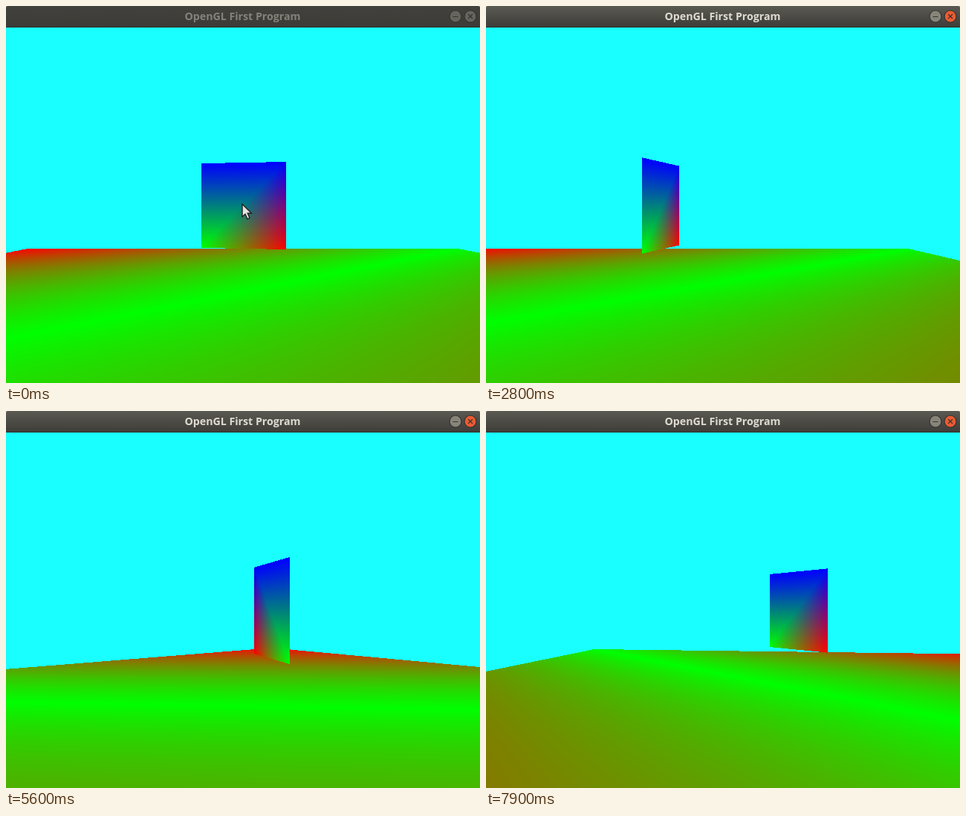
An HTML page with a canvas for the animation above (8 s loop, 638 by 508 pixels).

```html
<!DOCTYPE html>
<html lang="en">
<head>
<meta charset="utf-8">
<title>OpenGL First Program</title>
<style>
  html, body { margin: 0; width: 638px; height: 508px; overflow: hidden; background: #ddd; }
  header {
    position: absolute; top: 0; left: 0; width: 637px; height: 29px; padding-right: 1px;
    border-radius: 2px 2px 0 0; box-shadow: inset 0 -1px #32312d;
    background: linear-gradient(#42413c, #3c3b37); color: #85827b;
    font: bold 14.2px/28px "Open Sans", sans-serif; text-align: center;
  }
  header.active { background: linear-gradient(#5a5952, #3d3c38); color: #dfdbd2; }
  header svg { position: absolute; left: 596px; top: 5px; }
  circle { fill: #66645d; stroke: #34332f; }
  .active circle { fill: #87847a; }
  .active .close { fill: #ec5b31; }
  canvas { position: absolute; top: 29px; left: 0; }
  #cursor { position: absolute; }
</style>
</head>
<body>
<header>
  OpenGL First Program
  <svg width="40" height="18" fill="none" stroke="#34332f" stroke-width="1.2">
    <circle cx="9" cy="9" r="8"/>
    <circle class="close" cx="29" cy="9" r="8"/>
    <path d="M5.5 9.5h7M26 6l6 6M32 6l-6 6"/>
  </svg>
</header>
<canvas width="638" height="479"></canvas>
<svg id="cursor" width="16" height="24">
  <path d="M1 1V18L5 14.4L8 21L11 19.6L8.2 13.2H13.4Z" fill="#e4e4e4" stroke="#222" stroke-width="1.4"/>
</svg>
<script>
const W = 638, H = 479, DURATION = 8000, STEP = 100;
const FOCAL = 240 / Math.tan(Math.PI / 8), CX = 319, CY = 240;

// The camera circles the panel: [seconds, value], angles in degrees
const distance = track([4, 5], [4.5, 2.75], [5, 4.65], [6, 4.4], [6.3, 2.29], [6.5, 1.4], [7, 4.66], [7.9, 5.59]);
const azimuth = track([1.8, 0], [2.8, -8], [4, 6.2], [5.1, 6.2], [7, -189.5], [7.9, -268.1]);
const yaw = track([5.1, 0], [6.3, -117.4], [7, -219.3], [7.9, -277.8]);
const panelAngle = t => 29.8 * t - 10.3;

const ctx = document.querySelector('canvas').getContext('2d');
const header = document.querySelector('header');
const cursor = document.getElementById('cursor');
const image = ctx.createImageData(W, H);
const pixels = new Uint32Array(image.data.buffer);
const rgb = (r, g, b) => (255 << 24 | b * 255 << 16 | g * 255 << 8 | r * 255) >>> 0;
const SKY = rgb(.1, 1, 1);

// Linear between the points, constant outside them
function track(...points) {
  return t => {
    const next = points.findIndex(p => p[0] >= t);
    if (next === 0) return points[0][1];
    if (next < 0) return points[points.length - 1][1];
    const [t0, v0] = points[next - 1], [t1, v1] = points[next];
    return v0 + (v1 - v0) * (t - t0) / (t1 - t0);
  };
}

function direction(degrees) {
  const a = degrees * Math.PI / 180;
  return [Math.sin(a), Math.cos(a)];
}

// Blue top corners, green and red bottom corners, split along the diagonal
const panelColor = (u, v) => rgb(Math.max(0, u - v), 1 - Math.max(u, v), v);

function floorColor(x, z) {
  if (Math.abs(x) > 5 || Math.abs(z) > 5) return SKY;
  const red = Math.abs(x - z) / 10;
  return rgb(red, 1 - red, 0);
}

function drawScene(t) {
  const [camX, camZ] = direction(azimuth(t)).map(d => -d * distance(t));
  const [sin, cos] = direction(yaw(t));
  const [pz, px] = direction(panelAngle(t));
  for (let col = 0; col < W; col++) {
    const sx = (col + .5 - CX) / FOCAL;
    const dx = sx * cos + sin, dz = cos - sx * sin;
    // Panel column hit by this ray: depth and position across
    const depth = (camZ * px - camX * pz) / (dx * pz - dz * px);
    const u = (camX + dx * depth) * px + (camZ + dz * depth) * pz + .5;
    const hit = depth > .1 && u >= 0 && u <= 1;
    for (let row = 0; row < H; row++) {
      const sy = (row + .5 - CY) / FOCAL;
      const v = .5 - sy * depth;
      let color = SKY;
      if (hit && v >= 0 && v <= 1) color = panelColor(u, v);
      else if (sy > 0) color = floorColor(camX + dx / sy, camZ + dz / sy);
      pixels[row * W + col] = color;
    }
  }
  ctx.putImageData(image, 0, 0);
}

function drawCursor(t) {
  const k = Math.min(1, Math.max(0, (t - .2) / .6));
  cursor.style.display = t < 1.1 ? 'block' : 'none';
  cursor.style.left = 317 + 72 * k + 'px';
  cursor.style.top = 266 + 32 * k + 'px';
}

let shown = -1;
function tick() {
  const step = Math.floor(performance.now() % DURATION / STEP);
  if (step !== shown) {
    shown = step;
    const t = step * STEP / 1000;
    drawScene(t);
    drawCursor(t);
    header.classList.toggle('active', t >= 1.8);
  }
  requestAnimationFrame(tick);
}
tick();
</script>
</body>
</html>
```
